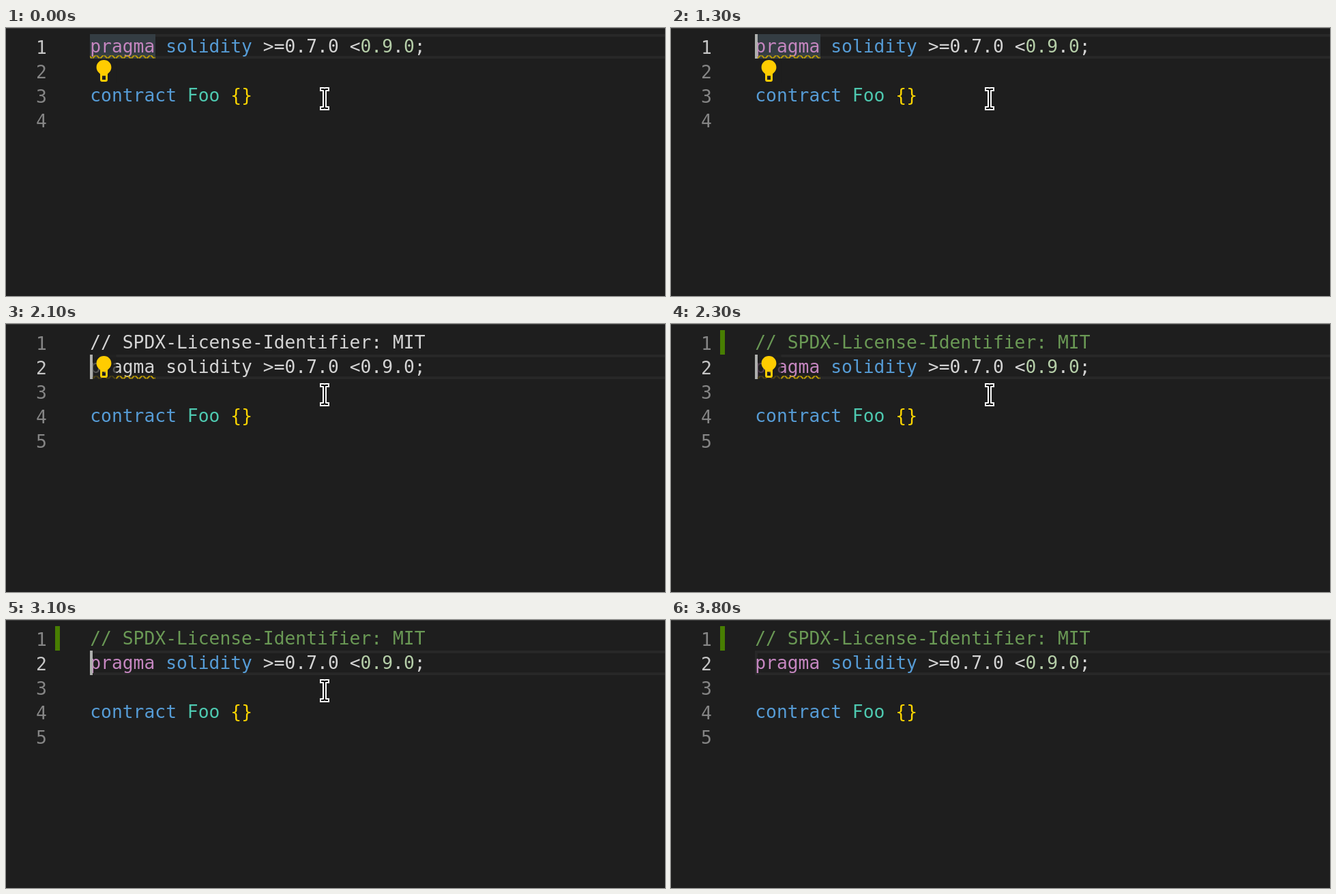
An HTML page that plays this animation: 966x394 px, repeating every 4.1 s.

```html
<!DOCTYPE html>
<html lang="en">
<head>
<meta charset="utf-8">
<title>Editor quick fix</title>
<style>
html, body { margin: 0; width: 100%; height: 100%; overflow: hidden; background: #1e1e1e; }
svg { display: block; width: 966px; height: 394px; }
text { white-space: pre; }
.code { font: 26.33px "DejaVu Sans Mono", monospace; }
.menu { font: 30.1px "Noto Sans", sans-serif; fill: #ccc; }
</style>
</head>
<body>
<svg viewBox="0 0 966 394" xmlns="http://www.w3.org/2000/svg">
  <defs>
    <pattern id="wave" width="6" height="3" patternUnits="userSpaceOnUse">
      <path fill="#cca700" d="M5.5 0 2.5 3H1.1L4.1 0ZM4 0 6 2V.6L5.4 0ZM0 2 1 3H2.4L0 .6Z"/>
    </pattern>
    <filter id="blur" x="-10%" y="-10%" width="120%" height="120%">
      <feGaussianBlur stdDeviation="7"/>
    </filter>
    <path id="beam" fill="none" stroke-linecap="square"
      d="M-4 -14H-2Q0 -14 0 -12Q0 -14 2 -14H4M0 -12V12M-4 14H-2Q0 14 0 12Q0 14 2 14H4"/>
  </defs>
  <rect width="966" height="394" fill="#1e1e1e"/>
  <rect width="966" height="1" fill="#3c3c3c"/>
  <rect id="line" x="124.9" y="10.9" width="860" height="32.2" fill="none" stroke="#282828" stroke-width="3.8"/>
  <rect id="word" x="123" y="9" width="96" height="36"/>
  <rect id="added" x="72" y="9" width="7" height="36" fill="#487e02"/>
  <g id="code" class="code"></g>
  <g id="squiggle">
    <rect width="50.5" height="3" fill="url(#wave)"/>
  </g>
  <g id="bulb">
    <rect x="123" y="45" width="38.5" height="36" fill="#1e1e1e" fill-opacity=".7"/>
    <path fill="#fc0" fill-rule="evenodd" d="M143.5 47C137.2 47 132.6 51.8 132.6 57.8C132.6 62.4 135.2 65 138 67.4V76Q138 79 141 79H146Q149 79 149 76V67.4C151.8 65 154.4 62.4 154.4 57.8C154.4 51.8 149.8 47 143.5 47ZM141 70.2H146V76H141Z"/>
  </g>
  <rect id="caret" x="123" y="9" width="4" height="36" fill="#aeafad"/>
  <g id="menu">
    <rect x="123" y="52" width="662" height="288" rx="11" opacity=".4" filter="url(#blur)"/>
    <rect x="123" y="50" width="662" height="288" rx="11" fill="#2d2f2f"/>
    <rect x="124" y="70" width="660" height="60" fill="#04395e" stroke="#0f6fc0" stroke-width="2"/>
    <g id="items" class="menu"></g>
    <g stroke="#1e1e1e" stroke-linejoin="round">
      <path fill="#fff" stroke-width="2" d="M467.5 105.5Q467 102.3 470 102.3Q472.5 102.3 473 105L474.5 113L486 115.5Q490 116.5 490 120L488.5 131.5Q488.3 133 486.5 133H472.5Q471 133 470 131.8L460.5 121.5Q459.5 120 461 118.5Q463 117 465.5 118.5L469.5 120.5Z"/>
      <path fill="none" stroke-width="1" d="M474.5 113L475.2 118M479.7 114.5L480 119M485 115.8V120"/>
    </g>
  </g>
  <g id="mouse">
    <use href="#beam" stroke="#fff" stroke-width="6"/>
    <use href="#beam" stroke="#000" stroke-width="2"/>
  </g>
</svg>
<script>
const LOOP = 4100, PITCH = 36;
const $ = id => document.getElementById(id);
const plain = '#d4d4d4', blue = '#569cd6', num = '#b5cea8';
const pragma = [['pragma', '#c586c0'], [' '], ['solidity', blue], [' >=0.7.0 <'],
  ['0.9', num], ['.'], ['0', num], [';']];
const contract = [['contract', blue], [' '], ['Foo', '#4ec9b0'], [' '], ['{}', '#ffd700']];
const license = [['// SPDX-License-Identifier: MIT', '#6a9955']];
const before = [pragma, [], contract, []];
const after = [license, pragma, [], contract, []];

const esc = s => s.replace(/</g, '&lt;').replace(/>/g, '&gt;');
const span = ([s, color = plain]) => `<tspan fill="${color}">${esc(s)}</tspan>`;
const bare = tokens => tokens.map(([s]) => [s]);

function codeMarkup(lines, active) {
  return lines.map((tokens, i) =>
    `<text x="52" y="${37.5 + i * PITCH}" text-anchor="middle" fill="${i === active ? '#c6c6c6' : '#858585'}">${i + 1}</text>` +
    `<text x="123.2" y="${36 + i * PITCH}">${tokens.map(span).join('')}</text>`).join('');
}

const views = {
  before: codeMarkup(before, 0),
  uncolored: codeMarkup([bare(license), bare(pragma), ...after.slice(2)], 1),
  after: codeMarkup(after, 1)
};

$('items').innerHTML = ['MIT', 'GPL-2.0-or-later', 'GPL-3.0-or-later', 'Unlicense'].map((name, i) =>
  `<text x="186" y="${110.8 + i * 62.3}"${i ? '' : ' fill="#fff"'}>Add license identifier: ${name}</text>`).join('');

const within = (t, ...spans) => spans.some(([a, b]) => t >= a && t < b);
const show = (id, on) => $(id).setAttribute('visibility', on ? 'visible' : 'hidden');
const shift = (id, x, y, more = '') => $(id).setAttribute('transform', `translate(${x} ${y})${more}`);

// Pointer stops: start time, x, y
const stops = [[0, 467, 104], [3400, 397, 76], [3600, 404, 34], [3700, 405, 6]];
let view = '';

function draw(t) {
  const open = within(t, [1400, 2100]);
  const edited = t >= 2100;
  const next = !edited ? 'before' : t < 2200 ? 'uncolored' : 'after';
  if (next !== view) $('code').innerHTML = views[view = next];

  const dy = edited ? PITCH : 0;
  shift('line', 0, dy);
  shift('caret', 0, dy);
  shift('squiggle', 123, 39.3 + dy, ' scale(1.895)');

  show('word', !edited);
  $('word').setAttribute('fill', open ? '#2a2e2e' : '#343d43');
  show('squiggle', t < 2400);
  show('bulb', t < 2400);
  show('added', t >= 2300);
  show('caret', within(t, [300, 800], [1300, 1400], [2100, 2600], [3100, 3600]));
  show('menu', open);

  const [, x, y] = stops.filter(s => t >= s[0]).pop();
  shift('mouse', x, y);
  show('mouse', !open && t < 3800);
}

const start = performance.now();
function tick() {
  draw((performance.now() - start) % LOOP);
  requestAnimationFrame(tick);
}
draw(0);
requestAnimationFrame(tick);
</script>
</body>
</html>
```
